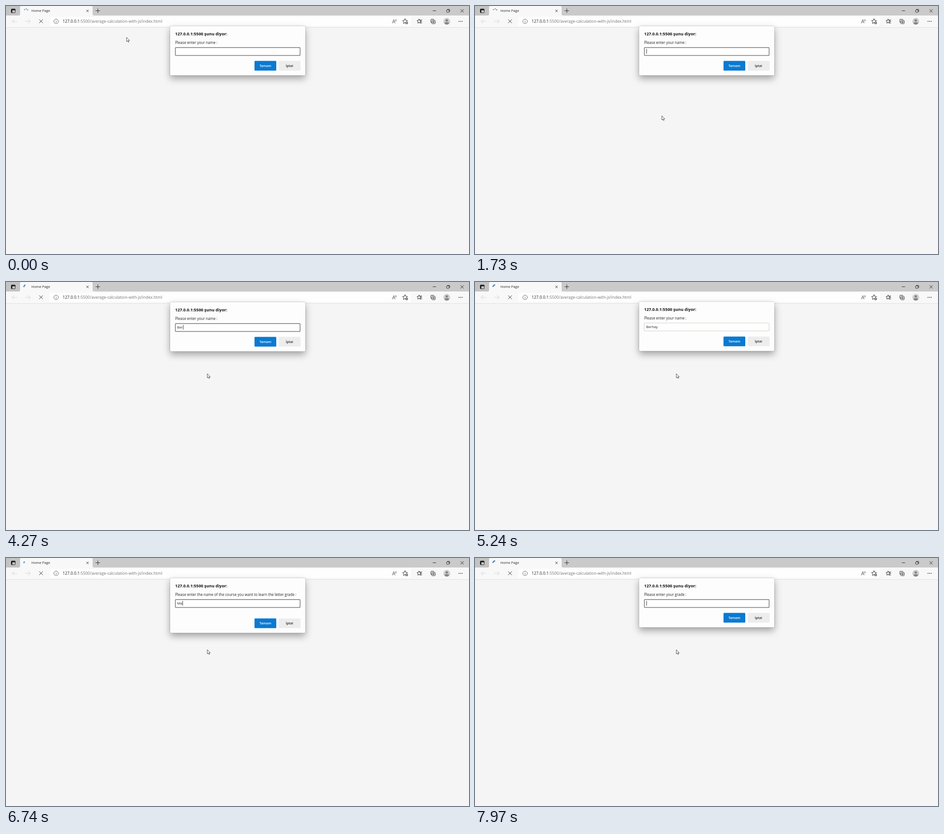
Animation, 1021 px wide and 549 px high, one loop 8 s. Source, as an HTML page:

```html
<!DOCTYPE html>
<html lang="en">
<head>
<meta charset="utf-8">
<title>Home Page</title>
<style>
  html, body { margin: 0; width: 100%; height: 100%; overflow: hidden; background: #f5f5f6; }
  svg { display: block; width: 1021px; height: 549px; }
  text { font-family: "Open Sans", "Noto Sans", sans-serif; fill: #222; white-space: pre; }
  .line { fill: none; stroke: #2b2b2b; stroke-width: 1; stroke-linecap: round; stroke-linejoin: round; }
  .off { stroke: #d3d3da; }
  .button { font-size: 7.3px; font-weight: 600; text-anchor: middle; }
  #card { fill: #fdfdfd; filter: drop-shadow(0 0 1px rgba(0,0,0,.3)) drop-shadow(0 7px 8px rgba(0,0,0,.34)); }
</style>
</head>
<body>
<svg viewBox="0 0 1021 549">
  <rect width="1021" height="549" fill="#f5f5f6"/>

  <!-- Tab strip -->
  <rect width="1021" height="21" fill="#cacacb"/>
  <rect width="31" height="21" fill="#c3c3c4"/>
  <path d="M28 21Q31 21 31 18V3Q31 0 34 0H188Q191 0 191 3V18Q191 21 194 21Z" fill="#f8f8f8"/>
  <rect x="11.5" y="6.5" width="9" height="8.5" rx="1.5" class="line"/>
  <path d="M11.5 9.5V8q0-1.5 1.5-1.5h6q1.5 0 1.5 1.5v1.5zM11.5 9h2.5v6h-1.500q-1 0-1-1z" fill="#222"/>
  <path id="spinner" fill="none" stroke="#1762a4" stroke-width="1.8"/>
  <text x="56" y="13.3" font-size="7.7">Home Page</text>
  <path class="line" d="M177.500 8.500l4.500 4.500m0-4.500l-4.500 4.500M198 10.500h9M202.500 6v9"/>
  <path class="line" d="M941.500 10.500h6.500M1002.500 7.500l6.500 6.500m0-6.500l-6.500 6.500"/>
  <path class="line" d="M971.500 9.500q0-.8.8-.8h4q.8 0 .8.800v3.500q0 .8-.8.800h-4q-.8 0-.8-.8zM973.500 7.300h3.800q1.300 0 1.300 1.300v3.500"/>

  <!-- Toolbar -->
  <rect y="21" width="1021" height="26" fill="#f8f8f8"/>
  <rect y="47" width="1021" height="1" fill="#dfdfe1"/>
  <rect x="96" y="24" width="797" height="20" rx="2.500" fill="#fefefe"/>
  <path class="line off" d="M24 34H13.500m4.500-4.500l-4.500 4.500 4.500 4.500M43 34h10.500m-4.500-4.500l4.500 4.500-4.500 4.500"/>
  <path class="line" d="M73.500 30l7.500 7.500m0-7.500l-7.500 7.500" stroke-width="1.2"/>
  <g class="line" style="stroke:#666">
    <circle cx="110.500" cy="34" r="5"/>
    <path d="M110.500 33.500v3M110.500 31.300v.1"/>
    <path d="M852 38l3-8 3 8m-5-2.700h4M858 30.500q1 1 0 2.500M860 29.500q1.800 2 0 4.500"/>
  </g>
  <text x="125" y="36.800" font-size="8.840" fill="#222">127.0.0.1<tspan fill="#727272">:5500/average-calculation-with-js/index.html</tspan></text>
  <path class="line star" id="star" d=""/>
  <circle cx="883.500" cy="37.500" r="2.800" fill="#555"/>
  <path d="M882 37.500h3M883.500 36v3" stroke="#fff" stroke-width=".8"/>
  <path class="line" id="favourites" d=""/>
  <path class="line" d="M913.500 31h3.500M914 34.500h3M912.500 37.500h4.500"/>
  <path class="line" d="M938.500 36.500h-.7q-1 0-1-1v-5q0-1.200 1.200-1.200h4.500q1 0 1 1M939 33q0-1.200 1.200-1.200h5q1.200 0 1.200 1.200v5q0 1.200-1.200 1.200h-5q-1.200 0-1.200-1.200zM940.500 35.500h4.500M942.700 33.300v4.500"/>
  <circle cx="972" cy="34" r="7.500" fill="#cfcfcf"/>
  <circle cx="972" cy="32" r="2.700" fill="#858585"/>
  <path d="M967 38.500q0-2.500 2.500-2.500h5q2.500 0 2.500 2.500-2 2.500-5 2.500t-5-2.500z" fill="#858585"/>
  <g fill="#222"><circle cx="999" cy="34" r=".9"/><circle cx="1002.500" cy="34" r=".9"/><circle cx="1006" cy="34" r=".9"/></g>

  <!-- Prompt -->
  <g id="dialog">
    <rect id="card" x="362" y="44.500" width="298" height="109" rx="2.500"/>
    <text x="373" y="65.200" font-size="9.050" font-weight="700" style="fill:#111">127.0.0.1:5500 şunu diyor:</text>
    <text id="message" x="373" y="83.800" font-size="8.040"></text>
    <rect id="field" fill="#fefefe"/>
    <text id="value" x="377.500" y="102.800" font-size="7.700"></text>
    <rect id="caret" y="95" width=".9" height="10.500" fill="#222"/>
    <g id="buttons">
      <rect x="548" y="121.500" width="48" height="21.500" rx="1.500" fill="#0a7ad1"/>
      <rect x="601.500" y="121.500" width="48" height="21.500" rx="1.500" fill="#ededed"/>
      <text class="button" x="572" y="134.800" style="fill:#fff">Tamam</text>
      <text class="button" x="625" y="134.800">İptal</text>
    </g>
  </g>

  <path id="pointer" d="M0 0V9.300L2.100 7.400 3.700 10.500 5.100 9.800 3.700 6.900H6.500Z" fill="#fff" stroke="#222" stroke-width=".8"/>
</svg>
<script>
const LOOP = 8000;
const BLINK = 530;
const el = id => document.getElementById(id);
const set = (node, attrs) => {
  for (const name in attrs) node.setAttribute(name, attrs[name]);
};
const clamp = x => Math.min(1, Math.max(0, x));
const ease = x => x * x * (3 - 2 * x);

// "blink" is a moment when the caret turns on; "blur" is when the prompt starts to close.
const prompts = [
  { open: -2000, blur: 5190, close: 5290, blink: -710, message: "Please enter your name :",
    answer: "Berhay", typeFrom: 3750, keyGap: 190, lift: .7, extra: 0 },
  { open: 5350, blur: 7670, close: 7770, blink: 5350,
    message: "Please enter the name of the course you want to learn the letter grade :",
    answer: "Math", typeFrom: 6450, keyGap: 220, lift: 0, extra: 12.3 },
  { open: 7840, blur: 9000, close: 9000, blink: 7840, message: "Please enter your grade :",
    answer: "", typeFrom: 9000, keyGap: 1, lift: 0, extra: 0 }
];

const pointerPath = [[0, 266, 69.500], [150, 266, 69.500], [1000, 412, 243], [2050, 412, 243], [2700, 444, 203]];

function pointerAt(t) {
  const next = pointerPath.findIndex(p => p[0] > t);
  if (next < 0) return pointerPath.at(-1).slice(1);
  const [a, b] = [pointerPath[next - 1], pointerPath[next]];
  const k = ease((t - a[0]) / (b[0] - a[0]));
  return [1, 2].map(i => a[i] + (b[i] - a[i]) * k);
}

function starPath(cx, cy, r) {
  const points = Array.from({ length: 10 }, (_, i) => {
    const angle = (i * 36 - 90) * Math.PI / 180, size = i % 2 ? r * .48 : r;
    return (cx + size * Math.cos(angle)).toFixed(2) + " " + (cy + size * Math.sin(angle)).toFixed(2);
  });
  return "M" + points.join("L") + "Z";
}

function arcPath(cx, cy, r, from, to) {
  const at = deg => {
    const angle = deg * Math.PI / 180;
    return `${cx + r * Math.cos(angle)} ${cy + r * Math.sin(angle)}`;
  };
  return `M${at(from)}A${r} ${r} 0 0 1 ${at(to)}`;
}

function drawSpinner(t) {
  const phase = ((t - 5240) / 908 % 1 + 1) % 1;
  const dotted = phase > .08 && phase < .65;
  const [from, to] = dotted ? [205 + phase * 40, 365]
    : phase >= .65 ? [175, 225 + (phase - .65) * 100] : [180, 275];
  set(el("spinner"), {
    d: arcPath(44, 11, 4.500, from, to),
    "stroke-dasharray": dotted ? "1.8 2.2" : "none"
  });
}

function drawPrompt(t) {
  const p = prompts.find(q => t >= q.open && t < q.close);
  el("dialog").style.display = p ? "" : "none";
  if (!p) return;

  const active = t < p.blur;
  const typed = Math.min(p.answer.length, Math.max(0, Math.floor((t - p.typeFrom) / p.keyGap) + 1));
  const lastKey = p.typeFrom + (typed - 1) * p.keyGap;
  const caretOn = Math.floor((t - (typed ? lastKey : p.blink)) / BLINK) % 2 === 0;

  el("message").textContent = p.message;
  el("value").textContent = p.answer.slice(0, typed);
  set(el("card"), { height: 109 + p.extra });
  set(el("buttons"), { transform: `translate(0 ${p.extra})` });
  set(el("field"), active
    ? { x: 373.500, y: 92, width: 275, height: 17.500, rx: 1, stroke: "#74746f", "stroke-width": 1.500 }
    : { x: 373, y: 91.500, width: 275.500, height: 17.500, rx: 1, stroke: "#cfcfcb", "stroke-width": 1 });
  set(el("caret"), {
    x: 378 + (typed ? el("value").getComputedTextLength() : 0),
    visibility: active && caretOn ? "visible" : "hidden"
  });
  const closing = clamp((t - p.blur) / 50);
  set(el("dialog"), {
    transform: `translate(0 ${-p.lift * closing})`,
    opacity: clamp((t - p.open) / 80)
  });
}

function draw(t) {
  drawSpinner(t);
  drawPrompt(t);
  set(el("pointer"), { transform: `translate(${pointerAt(t).join(" ")})` });
}

set(el("star"), { d: starPath(880, 34, 5.800) });
set(el("favourites"), { d: starPath(911, 34, 5) });

const start = performance.now();
function tick() {
  draw((performance.now() - start) % LOOP);
  requestAnimationFrame(tick);
}
tick();
</script>
</body>
</html>
```
